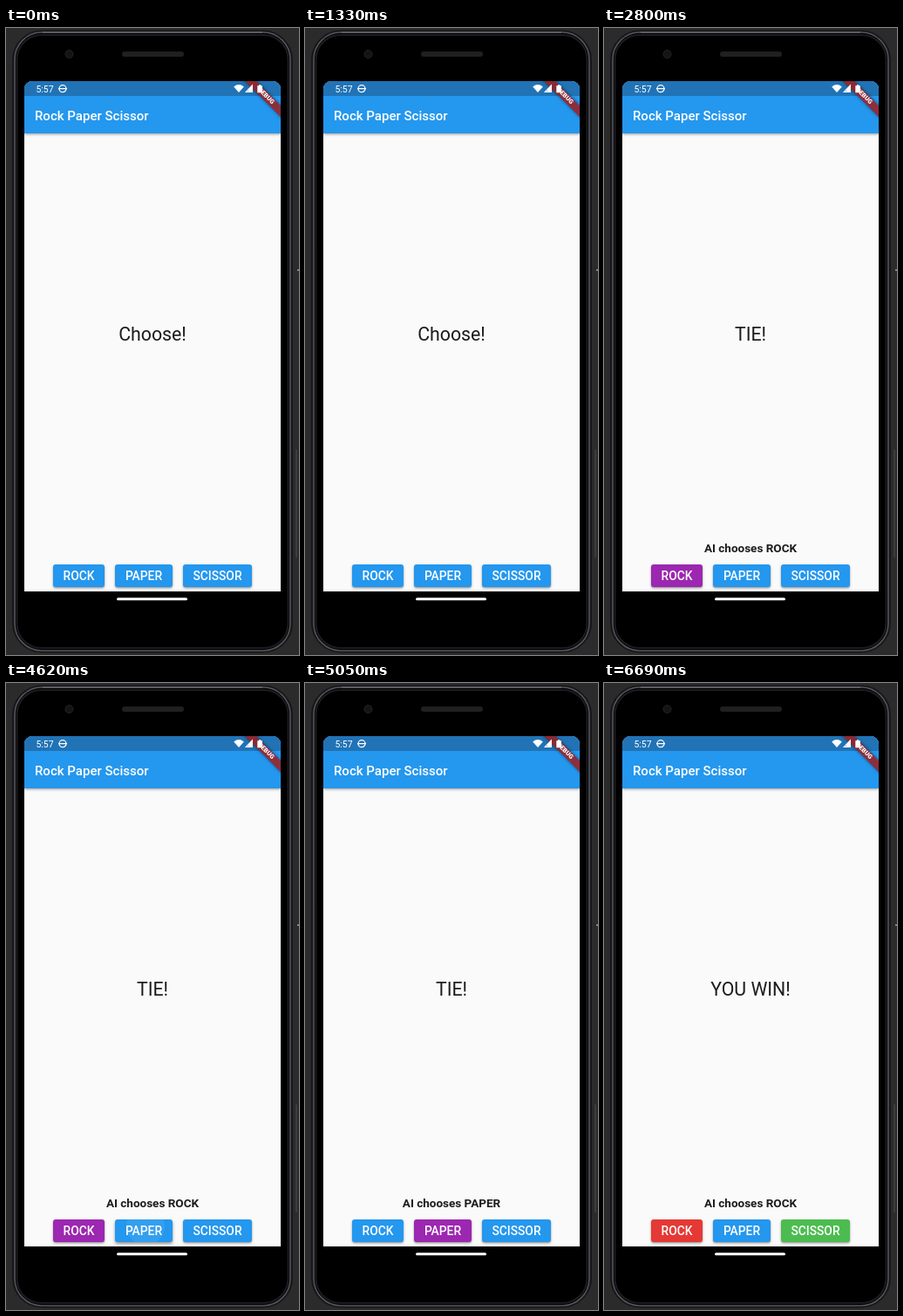
An HTML page that plays this animation: 336 by 720 pixels, repeating every 8 s.

```html
<!DOCTYPE html>
<html lang="en">
<head>
<meta charset="utf-8">
<title>Rock Paper Scissor</title>
<style>
  html, body { margin: 0; width: 100%; height: 100%; overflow: hidden; background: #2b2b2b; }
  #stage { position: relative; width: 336px; height: 720px; overflow: hidden; font-family: Roboto, sans-serif; }
  svg { position: absolute; left: 0; top: 0; }
  #screen {
    position: absolute; left: 21px; top: 61px; width: 294px; height: 586px;
    overflow: hidden; border-radius: 9px 9px 0 0; background: #fafafa;
  }
  #screen > * { position: absolute; white-space: nowrap; }
  .status { left: 0; top: 0; width: 294px; height: 17px; background: #2173b6; z-index: 1; }
  .bar {
    left: 0; top: 0; width: 294px; height: 60px; background: #2497ee;
    box-shadow: 0 1px 3px rgba(0, 0, 0, .4);
  }
  .title { left: 12px; top: 29.6px; font: 500 15px/20px Roboto, sans-serif; color: #fff; z-index: 1; }
  .banner {
    left: 245px; top: 13.2px; width: 64px; height: 8.8px; transform: rotate(45deg);
    background: rgba(160, 28, 28, .84); box-shadow: 0 0 4px rgba(0, 0, 0, .5);
    font: 900 7.2px/8.8px Roboto, sans-serif; color: #fff; text-align: center; z-index: 2;
  }
  #icons { z-index: 3; }
  #msg { left: 0; width: 294px; top: 276px; text-align: center; font: 400 21.3px/30px Roboto, sans-serif; color: #1c1c1c; }
  #ai { left: 0; width: 294px; top: 526px; text-align: center; font: 700 13.5px/20px Roboto, sans-serif; color: #1c1c1c; }
  #screen .btn {
    top: 555px; height: 26px; border-radius: 3px; color: #fff; text-align: center;
    font: 500 13.8px/27px Roboto, sans-serif;
  }
  .ink { position: absolute; inset: 0; overflow: hidden; border-radius: 3px; }
  .ink i { position: absolute; border-radius: 50%; background: #fff; opacity: 0; }
</style>
</head>
<body>
<div id="stage">
  <svg width="336" height="720">
    <rect width="336" height="720" fill="#2b2b2b"/>
    <rect x="332" y="484" width="2" height="124" fill="#3c3c40"/>
    <rect x="334" y="277" width="2" height="2" fill="#888"/>
    <g fill="none">
      <rect x="8" y="3.5" width="320" height="713" rx="33" fill="#000" stroke="#18181b" stroke-width="2"/>
      <rect x="10" y="5" width="316" height="710" rx="31" stroke="#56565f" stroke-width="1.6"/>
      <rect x="12.5" y="8" width="311" height="704" rx="28" stroke="#1c1c20" stroke-width="2"/>
      <path d="M42 5H294" stroke="#77777e"/>
    </g>
    <circle cx="72.5" cy="30" r="4.5" fill="#141416" stroke="#242428"/>
    <rect x="133" y="27" width="71" height="6" rx="3" fill="#202022"/>
    <rect x="127" y="654.3" width="81" height="3" rx="1.5" fill="#fff"/>
  </svg>
  <div id="screen">
    <div class="bar"></div>
    <div class="status"></div>
    <div class="title">Rock Paper Scissor</div>
    <div class="banner">DEBUG</div>
    <svg id="icons" width="294" height="18" fill="#fff">
      <text x="13.5" y="12.8" font-family="Roboto, sans-serif" font-size="10.4">5:57</text>
      <g fill="none" stroke="#fff" stroke-width="1.2">
        <circle cx="44" cy="8.7" r="4"/>
        <path d="M39 8.7H49"/>
        <path d="M261.3 5L254.3 12.4H261.3Z"/>
      </g>
      <path d="M240.2 6.4Q246 1.8 251.8 6.4L246 13Z"/>
      <path d="M257 10V12.8H261.6V5Z"/>
      <path d="M267.3 5.2H268.9V4.2H271.3V5.2H272.9V13.2H267.3Z"/>
    </svg>
    <div id="msg"></div>
    <div id="ai"></div>
  </div>
</div>
<script>
const LOOP = 8000;
const BLUE = '#2497ee', PURPLE = '#9c27b0', RED = '#e53935', GREEN = '#4cbc50';

// start time, message, AI pick, button colours
const states = [
  [0, 'Choose!', '', [BLUE, BLUE, BLUE]],
  [2240, 'TIE!', 'ROCK', [PURPLE, BLUE, BLUE]],
  [4720, 'TIE!', 'PAPER', [BLUE, PURPLE, BLUE]],
  [6440, 'YOU WIN!', 'ROCK', [RED, BLUE, GREEN]]
];

// button, touch point, start, end, optional held moments
const taps = [
  { btn: 0, x: 28, y: 12, from: 1790, to: 2800, holds: [1830, 2240, 2570, 2800] },
  { btn: 1, x: 35, y: 8, from: 4600, to: 5050 },
  { btn: 2, x: 40, y: 12, from: 6430, to: 6690 }
];

const $ = id => document.getElementById(id);
const clamp = v => Math.max(0, Math.min(1, v));
const easeOut = p => 1 - (1 - p) ** 3;

const buttons = [['ROCK', 33, 59], ['PAPER', 104, 66], ['SCISSOR', 182, 79]].map(([label, x, w], i) => {
  const el = document.createElement('div');
  el.className = 'btn';
  el.style.left = x + 'px';
  el.style.width = w + 'px';
  el.innerHTML = label + '<div class="ink"><i></i></div>';
  $('screen').append(el);
  return { el, w, ink: el.querySelector('i'), tap: taps.find(tap => tap.btn === i) };
});

function tapProgress(tap, t) {
  if (tap.holds) t = tap.holds.filter(h => h <= t).pop() ?? 0;
  return t < tap.from || t >= tap.to ? null : (t - tap.from) / (tap.to - tap.from);
}

function drawButton({ el, w, ink, tap }, color, t) {
  const p = tapProgress(tap, t);
  const lift = p === null ? 0 : clamp(p / .2) * clamp((1 - p) / .5);
  el.style.background = color;
  el.style.boxShadow = `0 ${1.2 + 3 * lift}px ${2.5 + 5 * lift}px rgba(0,0,0,.42)`;
  const r = w * (.14 + .9 * easeOut(clamp((p ?? 0) / .6)));
  Object.assign(ink.style, {
    left: tap.x - r + 'px', top: tap.y - r + 'px', width: 2 * r + 'px', height: 2 * r + 'px',
    opacity: p === null ? 0 : .24 * clamp(p / .15) * clamp((1 - p) / .55)
  });
}

function render(t) {
  const [, msg, pick, colors] = states.filter(s => s[0] <= t).pop();
  $('msg').textContent = msg;
  $('ai').textContent = pick && 'AI chooses ' + pick;
  buttons.forEach((b, i) => drawButton(b, colors[i], t));
}

const start = performance.now();
function tick() {
  render((performance.now() - start) % LOOP);
  requestAnimationFrame(tick);
}
tick();
</script>
</body>
</html>
```
